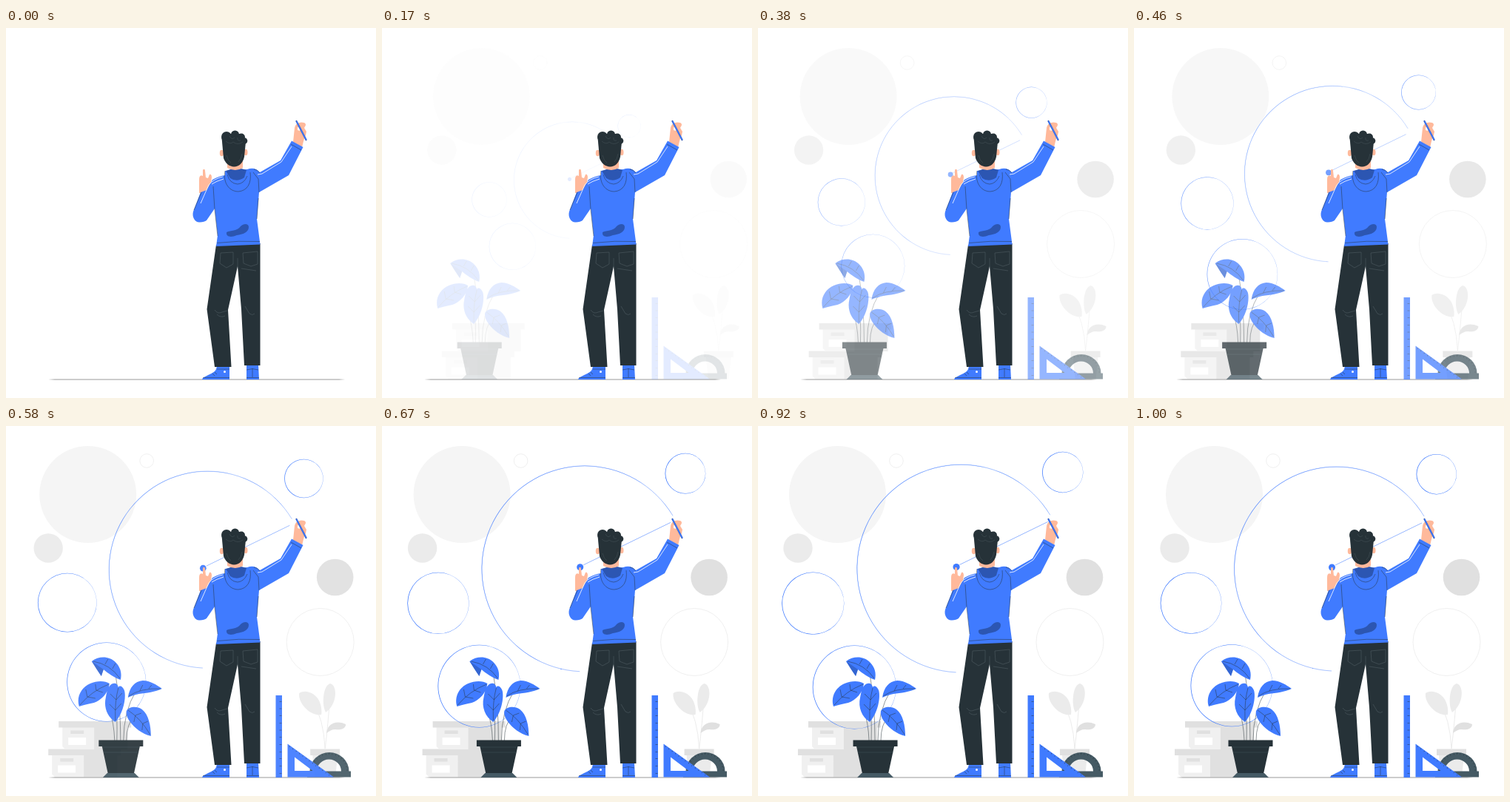
These frames come from a looping animation (500 px wide and 500 px high, 1040 ms). An HTML page:

```html
<!DOCTYPE html>
<html lang="en">
<head>
<meta charset="utf-8">
<title>Drawing circles</title>
<style>
  html, body { margin: 0; width: 100%; height: 100%; overflow: hidden; background: #fff; }
  svg { display: block; width: 100vw; height: 100vh; }
  .blue { fill: #407bff; }
  .dark { fill: #263238; }
  .skin { fill: #ffb99b; }
  .navy { fill: #2c56b2; }
  .slate { fill: #455a64; }
  .line { fill: none; stroke: #263238; stroke-width: .5; }
  .seam { fill: none; stroke: #56646b; stroke-width: .5; }
  .white { fill: none; stroke: #fff; stroke-width: .8; }
</style>
</head>
<body>
<svg viewBox="0 0 500 500">
  <g class="fade" data-slide="30">
    <circle cx="108.5" cy="92.5" r="65.5" fill="#f5f5f5"/>
    <circle cx="55" cy="165" r="19.7" fill="#ebebeb"/>
    <circle cx="442.5" cy="204.5" r="24.8" fill="#e0e0e0"/>
    <g fill="none" stroke="#e4e4e4" stroke-width=".6">
      <circle cx="188" cy="47" r="9.3"/>
      <circle cx="422.5" cy="292" r="45.5"/>
    </g>
    <!-- boxes -->
    <g id="box">
      <path fill="#f0f0f0" d="M60 444h44v30.500H64l-4-4z"/>
      <path fill="#e0e0e0" d="M103 444h45v30.500h-45zM55 436.500h98v8.500H55zM71 449h18v4.500H71z"/>
      <path fill="#fff" d="M68 458.500h24v10H68z"/>
    </g>
    <use href="#box" x="14" y="-37.500"/>
    <!-- pale plant -->
    <path fill="none" stroke="#e6e6e6" stroke-width=".8" d="M412 372Q427 395 429 436M436 360Q433 405 429 436M431 414Q438 406 450 406"/>
    <path fill="#ebebeb" d="M394 361C402 356 413 360 419 368C424 375 425 385 424 390C410 393 392 375 394 361M430 387C424 378 426 350 436 348C446 350 446 376 430 387"/>
    <path fill="#e0e0e0" d="M431 415C432 402 444 397 457 403C457 410 448 411 443 410C438 410 435 412 431 415M409 436.500h40v8.500h-40z"/>
    <path fill="#ebebeb" d="M412 445h34l-3 29h-28z"/>
  </g>

  <path d="M57 475L66 474.500H450L458 475L450 475.400H66Z" fill="#999"/>

  <g class="fade" id="zoom">
    <path class="blue" stroke="#407bff" stroke-width=".25" d="M267 331A138.120 138.120 0 1 1 392 122A138 138 0 1 0 267 331"/>
    <g id="rings" class="blue" fill-rule="evenodd"></g>
    <path d="M272 188L389 131" stroke="#407bff" stroke-width=".55"/>
    <circle class="blue" cx="267.500" cy="191" r="4.500"/>
  </g>

  <g class="fade" data-slide="-30">
    <path class="line" d="M152 425Q153 395 150 370M157 425Q157 375 150 335M161 425Q161 385 178 358M165 425Q165 402 176 392M149 425Q148 400 142 385"/>
    <path class="blue" d="M118 318C128 310 142 311 150 319C157 326 159 334 157 343C148 340 140 334 134 329L131 338C126 331 122 324 118 318M101 379C97 366 104 353 116 348C125 344 136 344 142 348C141 360 131 371 121 374C113 376 106 377 101 379M150 400C139 393 134 380 137 367C139 355 142 349 147 348C151 347 153 349 154 353C156 350 160 352 162 357C165 366 161 388 150 400M167 367C169 353 176 345 187 344C197 344 206 350 213 355C204 359 192 361 182 362C176 363 171 365 167 367M165 385C168 379 179 378 186 383C195 390 198 405 198 419C186 416 176 408 170 400C166 395 164 389 165 385"/>
    <path class="navy" d="M118 318L134 329L131 338C126 331 122 324 118 318" opacity=".6"/>
    <path class="line" d="M120 318Q143 322 156 341M136 322l4-7M146 328l4-7M102 377Q118 358 141 349M112 366l-2-10M112 366l11 2M124 357l-1-8M124 357l9 3M150 398Q149 372 154 354M150 384l-8-8M150 384l8-9M151 370l-8-8M151 370l8-9M168 365Q184 354 211 355M183 358l4-8M195 355l4-5M167 384Q184 395 197 417M177 391l8-3M177 391l-2 9M187 402l7-3M187 402l-1 9"/>
    <path class="dark" d="M127.500 424.500h60v8.500h-60zM132 433h51l-8 37h-35z"/>
    <path class="slate" d="M139 469h37l6 6H133z"/>
    <path class="seam" d="M132 434h51M134 441h48" opacity=".6"/>
  </g>

  <g class="fade">
    <path class="blue" d="M364.500 364H373V475H364.500z"/>
    <path class="slate" fill-rule="evenodd" d="M407 466.500H410.500A26.500 25.500 0 0 1 463.500 466.500H466V474.500H407zM420 466.500H453A16.500 16 0 0 0 420 466.500"/>
    <path fill="none" stroke="#263238" stroke-width="2" stroke-dasharray=".5 4" d="M413 466A24 23 0 0 1 461 466"/>
    <path class="blue" fill-rule="evenodd" d="M380.500 429.500V474.500H443zM390 447.500V466H414.500z"/>
    <path fill="none" stroke="#263238" stroke-width="3" stroke-dasharray=".5 9.200" d="M371 372V472"/>
    <path fill="none" stroke="#263238" stroke-width="1.500" stroke-dasharray=".5 5" d="M383 433L437 472"/>
  </g>

  <!-- man -->
  <path class="skin" d="M261 223V205C261 200 263 198 266 200V193C266 190 269 190 269 193L270 202L273 203L275 198C277 197 278 199 278 202L276 214L271 223z"/>
  <path class="skin" d="M388 154L390 135C391 129 397 126 403 128C407 130 404 133 403 135L406 140L405 145C402 150 402 155 400 161z"/>
  <path d="M394 134l4 1-1 4-3-1z" fill="#fff"/>
  <path d="M392.500 126L405.500 151" stroke="#2c56b2" stroke-width="2.200" stroke-linecap="round"/>
  <path d="M392.500 126L405.500 151" stroke="#407bff" stroke-width="1.600"/>

  <path class="blue" d="M285 457H302V475H265C266 471 275 469 279 466C284 463 284 461 285 457M325 455H341L342 475H325z"/>
  <path class="line" d="M266 472.500H302M285 461H302M325 472.500H342M325 462Q333 459 341 462M333 460V472M279 467l3 3M282 465l3 3"/>
  <circle cx="295.500" cy="464.500" r="1.500" fill="#fff"/>
  <path class="dark" d="M284 293L343.500 291V456H322L318 380L313 322L300 381L304.500 458H282L271.500 380z"/>
  <path class="seam" d="M290 304L307 303V319L298 324L289 318zM320 304L340 302V319L331 322L321 318zM313 311V324M318 325L338 328M282 381Q286 387 292 384L299 382M285 387Q290 392 296 389M323 376L329 386Q333 389 336 386"/>

  <path class="blue" d="M296 193L326 191Q336 187 343 195L371 179L386 152.500L401.500 161L382 199L342 222L339 258L343.500 292.500L284 295L286 280L282 244L271 260Q268 262 262 262.500C255 263 251 255 253 248L263 222L271 219L279 205Q288 200 296 199z"/>
  <path class="line" d="M280 214L282 245L286 281M285 290.500Q315 287 343 288.500M342 222L341 204L334 195M385 157L399 165M339 258L341 230M254 246L264 222"/>
  <path class="white" d="M293 201Q280 204 274 212L263 237M294 204Q284 207 278 211M340 198L346 197L372 181L386 160"/>
  <path class="navy" d="M297 193Q312 187 325 192L322 202Q312 209 303 203zM298 276C304 273 312 275 317 268C321 264 328 264 328 269C328 276 320 279 312 280C305 283 297 283 298 276"/>
  <path class="line" d="M296 193C293 210 302 221 314 221C326 220 332 210 330 195M299 198Q302 210 313 211Q322 210 326 200M335 191Q340 191 343 196"/>

  <path class="skin" d="M299 180H320V189Q310 195 299 189z"/>
  <ellipse class="skin" cx="291.500" cy="169" rx="2.700" ry="4.300"/>
  <ellipse class="skin" cx="324" cy="168" rx="2.500" ry="4.300"/>
  <path class="dark" d="M291.500 148L302 143H318L324 154L322 174C320 183 315 187 308 187.500C302 187 297 184 294 176z"/>
  <g class="dark">
    <circle cx="298" cy="147" r="7"/><circle cx="309.500" cy="144" r="5.500"/>
    <circle cx="318" cy="147.500" r="5"/><circle cx="322" cy="152.500" r="4.300"/>
  </g>
  <path class="seam" d="M297 153Q303 158 307 154Q313 159 320 154M302 146Q305 152 309 148M313 148Q312 153 317 152M298 172Q300 180 304 182M319 170Q318 177 314 181" opacity=".7"/>
</svg>
<script>
  const LOOP = 1040, FPS = 24, PIVOT = [235, 222];
  const fades = document.querySelectorAll('.fade');
  const zoom = document.getElementById('zoom');

  const circle = (x, y, r) => `M${x - r} ${y}a${r} ${r} 0 1 0 ${2 * r} 0a${r} ${r} 0 1 0 ${-2 * r} 0z`;
  // Rings thin out towards their right side.
  const ring = (x, y, r) => `<path d="${circle(x, y, r)}${circle(x + .25, y, r - .5)}"/>`;
  document.getElementById('rings').innerHTML =
    ring(408.7, 65.2, 27.2) + ring(77, 239.3, 41.4) + ring(132, 350.7, 55.5);

  const bez = (a, b, s) => 3 * (1 - s) ** 2 * s * a + 3 * (1 - s) * s * s * b + s ** 3;

  // cubic-bezier(.36, -.01, .5, 1.38), which overshoots before settling
  function ease(x) {
    if (x >= 1) return 1;
    let lo = 0, hi = 1;
    for (let i = 0; i < 24; i++) {
      const mid = (lo + hi) / 2;
      if (bez(.36, .5, mid) < x) lo = mid; else hi = mid;
    }
    return bez(-.01, 1.38, lo);
  }

  function draw() {
    const t = performance.now() % LOOP;
    const step = Math.floor((t + 4) * FPS / 1000);
    const p = step < 2 ? 0 : ease(step / FPS + .03);
    for (const g of fades) {
      g.setAttribute('opacity', Math.max(0, Math.min(1, p)));
      if (g.dataset.slide) g.setAttribute('transform', `translate(${g.dataset.slide * (1 - p)})`);
    }
    const [x, y] = PIVOT;
    zoom.setAttribute('transform', `translate(${x} ${y}) scale(${.5 + .5 * p}) translate(${-x} ${-y})`);
    requestAnimationFrame(draw);
  }
  draw();
</script>
</body>
</html>
```
